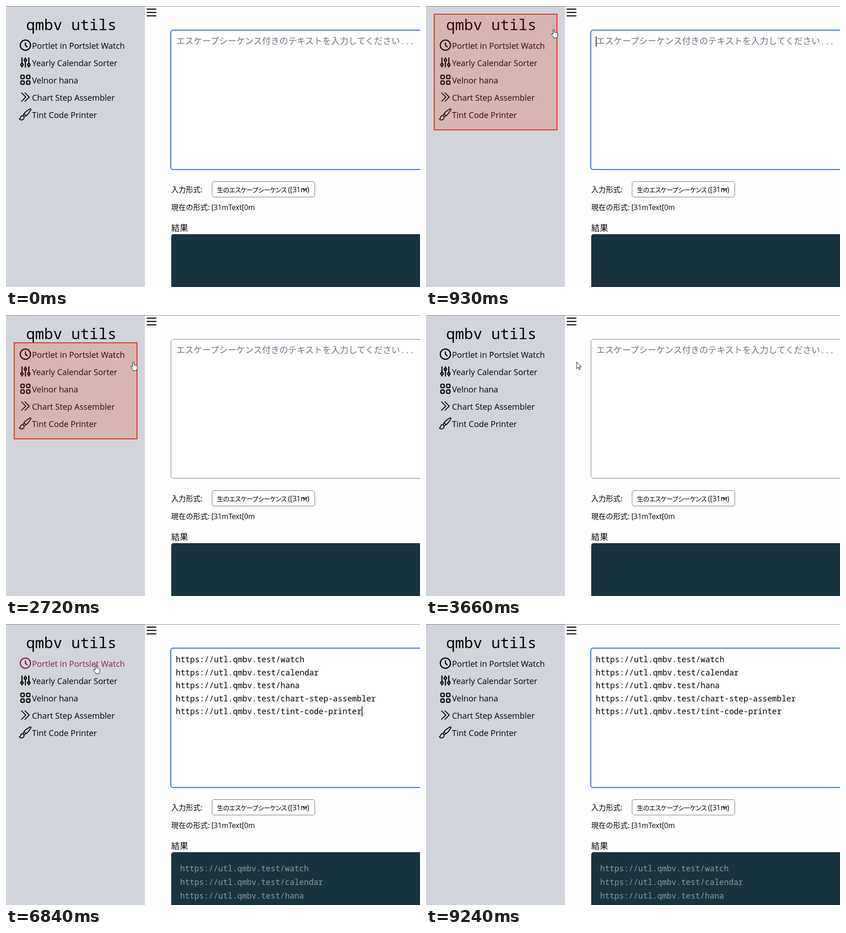
Write an HTML page that moves like this. It is 907x617 px and loops after 9.64 s.

```html
<!DOCTYPE html>
<html lang="ja">
<head>
<meta charset="utf-8">
<title>Escape sequence viewer</title>
<style>
html, body { margin: 0; width: 100%; height: 100%; overflow: hidden; background: #fff; }
svg { display: block; width: 907px; height: 617px; }
text { white-space: pre; fill: #000; }
.ui { font-family: "Open Sans", "Noto Sans CJK JP", "Noto Sans CJK", sans-serif; }
.jp { font-family: "Noto Sans CJK JP", "Noto Sans CJK", sans-serif; font-size: 16px; }
.mono { font-family: "Noto Sans Mono", monospace; font-size: 17.4px; font-weight: 500; }
.line { fill: none; stroke: #000; stroke-width: 2; stroke-linecap: round; stroke-linejoin: round; }
.item { font-size: 18px; }
.item.on text { fill: #8f1d4a; }
.item.on .line { stroke: #8f1d4a; }
.hint, .hint tspan { fill: #6b7280; font-weight: 400; }
.out text { fill: #8b9a9b; font-weight: 400; }
</style>
</head>
<body>
<svg viewBox="0 0 907 617">
  <rect width="907" height="617" fill="#fefefe"/>
  <rect width="304.5" height="617" fill="#d1d5db"/>
  <rect width="907" height="1" fill="#80838a"/>
  <text class="mono" x="44" y="53" style="font-size:33px">qmbv utils</text>
  <path class="line" d="M309 6.800H328.500M309 14.200H328.500M309 21.600H328.500" style="stroke-width:2.300"/>
  <g id="menu" class="ui"></g>

  <rect id="area" width="600" rx="5" fill="#fff"/>
  <text id="hint" class="jp hint" x="373" y="83.500" style="font-size:19px">エスケープシーケンス付きのテキストを入力してください<tspan class="mono">...</tspan></text>
  <g id="input" class="mono"></g>

  <text class="jp" x="362" y="409">入力形式:</text>
  <rect x="451.500" y="385.500" width="225" height="34" rx="4.500" fill="#fff" stroke="#6b7280"/>
  <text class="jp" x="462" y="409" style="font-size:14.200px;font-feature-settings:'palt';letter-spacing:-.5px">生のエスケープシーケンス</text>
  <text class="ui" x="618" y="409" font-size="15.500">([31m)</text>
  <path class="line" d="M649.500 400.500L654.500 405L659.500 400.500" style="stroke-width:1.500"/>
  <text class="jp" x="362" y="448">現在の形式:</text>
  <text class="ui" x="450" y="448" font-size="15.500">[31mText[0m</text>
  <text class="jp" x="362" y="494" style="font-size:18.500px">結果</text>
  <rect x="362" y="501" width="600" height="140" rx="5" fill="#19343f"/>
  <g id="output" class="mono out"></g>

  <rect id="caret" width="1.600" height="22" fill="#000"/>
  <rect id="mark" fill="rgba(232,50,20,.2)" stroke="#e8351a" stroke-width="2.200"/>
  <g id="pointer" stroke-linejoin="round">
    <path id="hand" fill="#fff" stroke="#111" d="M-1.500 10V1Q-1.500-.5 0-.5T1.500 1V6Q3 4.800 4.200 6.600Q5.600 5.600 6.600 7.400Q8.500 7 8.500 9V13Q8.500 15 7 16V18H-.5V16.500L-2 15Q-4 12-5 10.500Q-5.500 8.500-3.500 9Z"/>
    <path id="arrow" fill="#fff" stroke="#111" d="M0 0V15L3.400 11.800L5.800 17L8 16L5.700 11H10.500Z"/>
    <path id="beam" fill="none" stroke="#333" d="M-3-6H-1L0-5L1-6H3M0-5V6M-3 7H-1L0 6L1 7H3"/>
  </g>
</svg>
<script>
const $ = id => document.getElementById(id);
const LOOP = 9640, PASTE = 4640;

// Icon shapes on a 24-unit grid
const ring = (x, y) => `M${x - 2} ${y}a2 2 0 1 0 4 0a2 2 0 1 0-4 0`;
const tile = (x, y) => `M${x} ${y + 2}a2 2 0 0 1 2-2h2a2 2 0 0 1 2 2v2a2 2 0 0 1-2 2h-2a2 2 0 0 1-2-2z`;
const menu = [
  ['Portlet in Portslet Watch', 'M12 8v4l3 3M21 12a9 9 0 1 1-18 0a9 9 0 0 1 18 0z', 2],
  ['Yearly Calendar Sorter', 'M12 4v2M12 10v10M6 4v10M6 18v2M18 4v10M18 18v2' + ring(12, 8) + ring(6, 16) + ring(18, 16), 2],
  ['Velnor hana', tile(4, 4) + tile(14, 4) + tile(4, 14) + tile(14, 14), 2],
  ['Chart Step Assembler', 'M5.25 4.5l7.5 7.5l-7.5 7.5M11.25 4.5l7.5 7.5l-7.5 7.5', 1.5],
  ['Tint Code Printer', 'M9.5 16.1A3 3 0 0 0 3.75 17.25A2.25 2.25 0 0 1 1.35 19.5A4.5 4.5 0 0 0 9.75 17.25Q9.75 16.7 9.5 16.1Q14.6 14.3 17.7 9.9L21.6 4A1.15 1.15 0 0 0 20 2.4L14.1 6.3Q9.6 9.3 7.9 14.5M12.900 14.500A6.800 6.800 0 0 0 9.500 11.100', 1.5]
];
$('menu').innerHTML = menu.map(([name, icon, weight], i) => `<g class="item">
  <path class="line" transform="translate(27.5 ${71 + 38 * i}) scale(1.25)" style="stroke-width:${weight}" d="${icon}"/>
  <text x="57" y="${93.5 + 38 * i}">${name}</text></g>`).join('');
const items = [...$('menu').children];

const urls = ['watch', 'calendar', 'hana', 'chart-step-assembler', 'tint-code-printer']
  .map(path => 'https://utl.qmbv.test/' + path);
const lines = (x, y, step) => urls.map((u, i) => `<text x="${x}" y="${y + step * i}">${u}</text>`).join('');
$('input').innerHTML = lines(372, 84, 28.5);
$('output').innerHTML = lines(381.5, 542.5, 30);

// Outlined regions of the element picker: x, y, width, height, radius
const zones = {
  area: [358.6, 49.6, 600, 313, 7],
  result: [358.6, 497.6, 600, 150, 7],
  nav: [18, 18, 269, 254, 0],
  list: [18, 61, 269, 211, 0],
  link: [56, 70, 205, 31, 0]
};

// Time, x, y, pointer shape, outlined region, hovered item
const track = [
  [0],
  [150, 800, 560, 'hand', 'result'],
  [280, 690, 440, 'hand'],
  [420, 560, 300, 'hand', 'area'],
  [550, 430, 170, 'hand', 'area'],
  [680, 357, 80, 'hand', 'area'],
  [800, 312, 66, 'hand'],
  [930, 280, 52, 'hand', 'nav'],
  [1060, 250, 66, 'hand', 'list'],
  [1190, 232, 76, 'hand', 'link', 0],
  [1330, 223, 79, 'hand', 'link', 0],
  [1470, 238, 84, 'hand', 'link', 0],
  [1610, 252, 90, 'hand', 'link', 0],
  [1740, 268, 97, 'hand', 'list'],
  [1870, 276, 102, 'hand', 'list'],
  [2010, 279, 104, 'hand', 'list'],
  [2850, 279, 104, 'arrow'],
  [3530, 330, 103, 'arrow'],
  [3670, 405, 99, 'beam'],
  [3810, 443, 97, 'beam'],
  [5890, 442, 104, 'beam'],
  [6030, 436, 125, 'beam'],
  [6160, 425, 145, 'beam'],
  [6290, 405, 155, 'beam'],
  [6430, 378, 148, 'beam'],
  [6560, 345, 132, 'arrow'],
  [6690, 306, 112, 'arrow'],
  [6840, 197, 91, 'hand', '', 0],
  [6990, 186, 96, 'hand', '', 0],
  [7120, 168, 122, 'hand', '', 1],
  [7250, 145, 155, 'hand', '', 2],
  [7510, 142, 192, 'hand', '', 3],
  [7740, 146, 228, 'hand', '', 4],
  [8030, 160, 234, 'hand', '', 4],
  [8170, 350, 262, 'arrow'],
  [8440, 640, 290, 'beam'],
  [8710, 740, 430, 'arrow'],
  [8840, 835, 592, 'arrow'],
  [8960]
];

// Each time toggles the caret
const blinks = [680, 1190, 1720, 2300, 3670, 4240, 4640, 5200, 5760, 6290, 6690, 7220, 7740, 8300, 8710, 9240];

const show = (el, on) => { el.style.display = on ? '' : 'none'; };
const set = (el, attrs) => { for (const k in attrs) el.setAttribute(k, attrs[k]); };

function draw(t) {
  const pasted = t >= PASTE;
  show($('hint'), !pasted);
  show($('input'), pasted);
  show($('output'), pasted);

  const blurred = t >= 2580 && t < 3670;
  set($('area'), blurred
    ? { x: 361.5, y: 53.5, height: 305, stroke: '#6b7280', 'stroke-width': 1 }
    : { x: 361, y: 53, height: 306, stroke: '#2f66dc', 'stroke-width': 2 });

  show($('caret'), blinks.filter(b => b <= t).length % 2);
  set($('caret'), pasted ? { x: 779.3, y: 181 } : { x: 372, y: 67 });

  const [, x, y, shape, zone, item] = track.filter(k => k[0] <= t).pop();
  items.forEach((el, i) => el.classList.toggle('on', i === item));
  show($('mark'), zone);
  if (zone) {
    const [zx, zy, width, height, rx] = zones[zone];
    set($('mark'), { x: zx, y: zy, width, height, rx });
  }
  for (const id of ['hand', 'arrow', 'beam']) show($(id), id === shape);
  if (shape) set($('pointer'), { transform: `translate(${x} ${y})` });
}

const start = performance.now();
function tick() {
  draw((performance.now() - start) % LOOP);
  requestAnimationFrame(tick);
}
tick();
</script>
</body>
</html>
```
